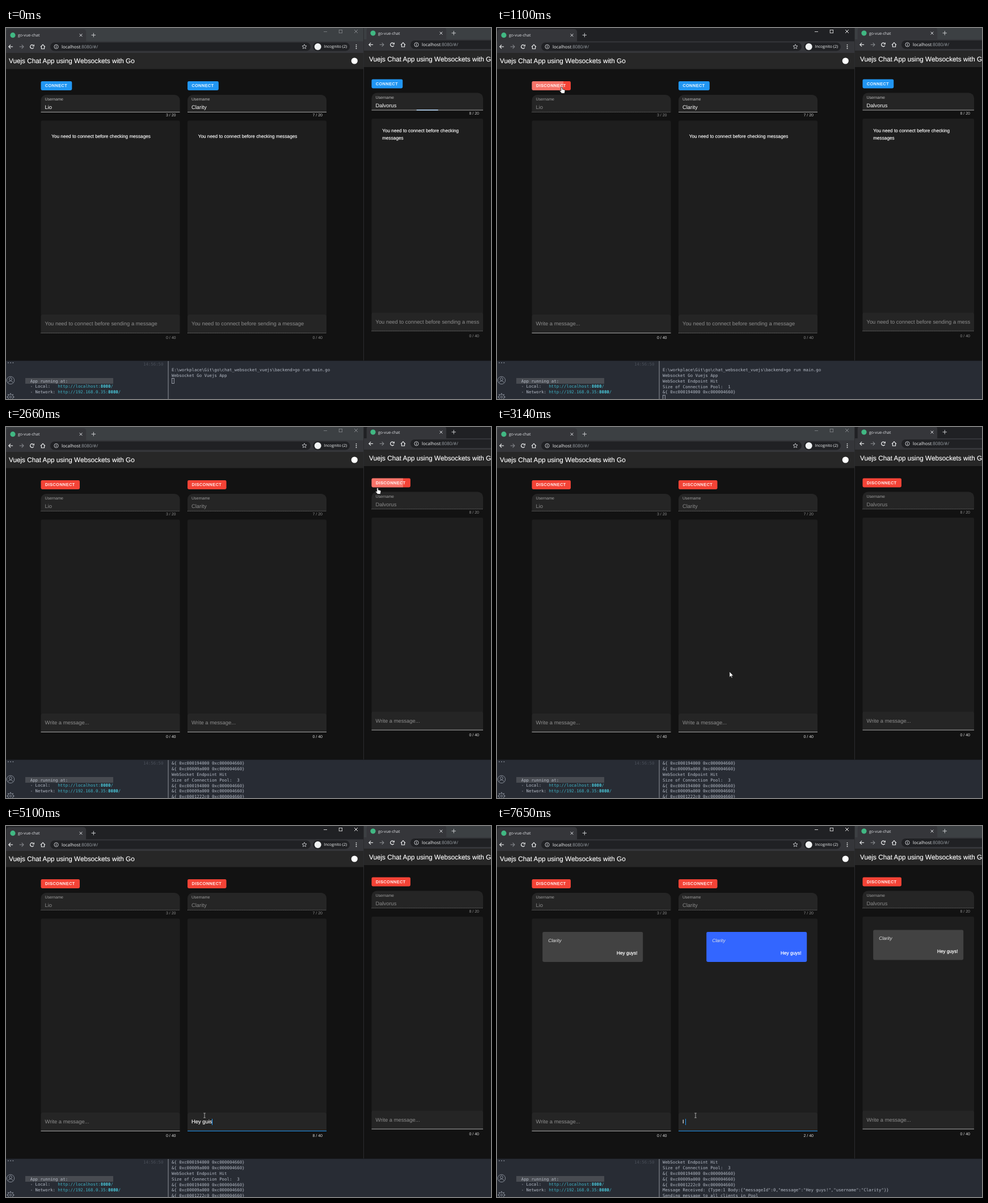
Animation, 855 px wide and 655 px high, one loop 8 s. Source, as an HTML page with a canvas:

```html
<!DOCTYPE html>
<html lang="en">
<head>
<meta charset="utf-8">
<title>Chat demo</title>
<style>
html, body { margin: 0; width: 855px; height: 655px; overflow: hidden; background: #121212; }
canvas { display: block; }
</style>
</head>
<body>
<canvas id="stage" width="855" height="655"></canvas>
<script>
const ctx = document.getElementById('stage').getContext('2d');
const LOOP = 8000;
const SANS = '"Liberation Sans", Arial, sans-serif';
const UI = '"Open Sans", "Noto Sans", sans-serif';
const MONO = '"DejaVu Sans Mono", monospace';
const BODY = 9.39, MEDIUM = 8.22, SMALL = 7.04;
const CLICK_DELAY = 75;
const FIELD_FOCUS = 3380, SENT = 7030;
const MESSAGE = 'Hey guys!', SENDER = 'Clarity';

const columns = [
  { x: 61.5, w: 245, dy: 0, name: 'Lio', press: 1020 },
  { x: 320, w: 245, dy: 0, name: SENDER, press: 1800 },
  { x: 644.5, w: 196.5, dy: -3.6, name: 'Dalvorus', press: 2580 }
];

// [time, text] of the message being typed
const typing = [
  [3320, ''], [4240, 'H'], [4400, 'He'], [4480, 'Hey'], [4630, 'Hey '],
  [4790, 'Hey g'], [4940, 'Hey gui'], [5100, 'Hey guis'], [5410, 'Hey gui'],
  [5560, 'Hey gu'], [5640, 'Hey g'], [6180, 'Hey gu'], [6330, 'Hey guy'],
  [6410, 'Hey guys'], [6720, MESSAGE], [SENT, ''], [7500, 'I'], [7650, 'I ']
];

// [time, x, y] of the pointer tip
const pointerPath = [
  [70, 470, 600], [780, 114, 104], [1170, 114, 104], [1650, 350, 104],
  [1960, 350, 104], [2350, 655, 107], [2740, 655, 107], [3300, 350, 511]
];

const client = id => `&{ 0xc000${id} 0xc000004660}`;
const joined = (size, ...ids) =>
  ['WebSocket Endpoint Hit', `Size of Connection Pool:  ${size}`, ...ids.map(client)];
const log = [
  [0, ['E:\\workplace\\Git\\go\\chat_websocket_vuejs\\backend>go run main.go', 'Websocket Go Vuejs App']],
  [columns[0].press + CLICK_DELAY, joined(1, '194000')],
  [columns[1].press + CLICK_DELAY, joined(2, '194000', '09a000')],
  [columns[2].press + CLICK_DELAY, joined(3, '194000', '09a000', '1222c0')],
  [SENT, [
    `Message Received: {Type:1 Body:{"messageId":0,"message":"${MESSAGE}","username":"${SENDER}"}}`,
    'Sending message to all clients in Pool'
  ]]
];

const clamp = v => Math.max(0, Math.min(1, v));
const ease = v => v * v * (3 - 2 * v);
const white = a => `rgba(255,255,255,${a})`;

function rect(x, y, w, h, color, radius = 0) {
  ctx.fillStyle = color;
  ctx.beginPath();
  ctx.roundRect(x, y, w, h, radius);
  ctx.fill();
}

function circle(x, y, r, color, filled = true) {
  ctx.beginPath();
  ctx.arc(x, y, r, 0, Math.PI * 2);
  ctx.fillStyle = ctx.strokeStyle = color;
  filled ? ctx.fill() : ctx.stroke();
}

function line(color, width, ...points) {
  ctx.strokeStyle = color;
  ctx.lineWidth = width;
  ctx.beginPath();
  points.forEach(([x, y]) => ctx.lineTo(x, y));
  ctx.stroke();
}

// y is the middle of the capital letters
function text(s, x, y, size, color, { font = SANS, style = '', align = 'left', heavy = 0, spacing = 0 } = {}) {
  ctx.font = `${style} ${size}px ${font}`;
  ctx.letterSpacing = `${spacing}px`;
  ctx.textAlign = align;
  ctx.fillStyle = color;
  ctx.fillText(s, x, y + size * 0.355);
  if (heavy) {
    ctx.strokeStyle = color;
    ctx.lineWidth = heavy;
    ctx.strokeText(s, x, y + size * 0.355);
  }
  const width = ctx.measureText(s).width;
  ctx.letterSpacing = '0px';
  return width;
}

function cross(x, y, r, color) {
  line(color, 1, [x - r, y - r], [x + r, y + r]);
  line(color, 1, [x + r, y - r], [x - r, y + r]);
}

function plus(x, y, r, color) {
  line(color, 1, [x - r, y], [x + r, y]);
  line(color, 1, [x, y - r], [x, y + r]);
}

function arrow(x, y, dir, color) {
  line(color, 1.1, [x - 3.6 * dir, y], [x + 3.6 * dir, y]);
  line(color, 1.1, [x + 0.4 * dir, y - 3.3], [x + 3.7 * dir, y], [x + 0.4 * dir, y + 3.3]);
}

function star(x, y) {
  const points = Array.from({ length: 11 }, (_, i) => {
    const a = -Math.PI / 2 + i * Math.PI / 5, r = i % 2 ? 1.9 : 4.2;
    return [x + r * Math.cos(a), y + r * Math.sin(a)];
  });
  line('#dadce0', 0.8, ...points);
}

function browser(left, width, dx, dy, focused) {
  ctx.save();
  ctx.beginPath();
  ctx.rect(left, 0, width, 587);
  ctx.clip();
  rect(left, 0, width, 587, '#121212');
  ctx.translate(dx, dy);
  rect(-5, 0, 640, 24, focused ? '#202124' : '#3c4043');
  rect(-5, -dy - 4, 640, 4, focused ? '#202124' : '#3c4043');
  rect(0.7, 2, 140.5, 24, '#35363a', [5, 5, 0, 0]);
  rect(-5, 23.5, 640, 20.5, '#35363a');

  circle(12, 12.7, 4.6, '#41b883');
  text('go-vue-chat', 21, 12.7, SMALL, '#dfe1e5', { font: UI });
  cross(132, 12.7, 2.4, '#dfe1e5');
  plus(154.3, 12.5, 3.7, '#c8cacd');

  arrow(8.5, 33, -1, '#f1f3f4');
  arrow(27.3, 33, 1, '#85888c');
  ctx.lineWidth = 1.2;
  ctx.strokeStyle = '#f1f3f4';
  ctx.beginPath();
  ctx.arc(46, 33, 3.2, 0.5, 5.4);
  ctx.stroke();
  line('#f1f3f4', 1.2, [49.3, 29.3], [49.3, 32], [46.6, 32]);
  line('#f1f3f4', 1.1, [61, 33.4], [65, 29.4], [69, 33.4]);
  line('#f1f3f4', 1.1, [62.4, 32.6], [62.4, 36.8], [67.6, 36.8], [67.6, 32.6]);

  rect(78, 25.5, 459, 15, '#202124', 7.5);
  ctx.lineWidth = 0.9;
  circle(88.5, 33, 3.6, '#dadce0', false);
  rect(88, 32.4, 1, 2.6, '#dadce0');
  rect(88, 30.8, 1, 1, '#dadce0');
  const host = text('localhost', 98, 33, 7.9, '#f1f3f4', { font: UI });
  text(':8080/#/', 98 + host, 33, 7.9, '#9aa0a6', { font: UI });
  star(526, 33);
  rect(541, 25.5, 65, 15, '#202124', 7.5);
  circle(549.7, 33, 6, '#f1f3f4');
  text('Incognito (2)', 560.5, 33, SMALL, '#f1f3f4', { font: UI });
  for (let i = -1; i < 2; i++) circle(617.5, 33 + i * 3.2, 0.9, '#f1f3f4');

  const control = focused ? '#f4f4f4' : '#85888c';
  line(control, 0.8, [560, 6.5], [566, 6.5]);
  ctx.lineWidth = 0.8;
  ctx.strokeRect(587.2, 3.4, 5.4, 5.4);
  cross(617, 6, 2.9, control);

  rect(-5, 44, 640, 28.5, '#272727');
  text('Vuejs Chat App using Websockets with Go', 5, 58.3, 11.74, '#fff', { heavy: 0.15 });
  circle(614.3, 58, 5.6, '#fff');
  ctx.restore();
}

function underline(col, y, enabled) {
  if (enabled) return rect(col.x, y, col.w, 1, white(0.6));
  ctx.setLineDash([1.2, 1.2]);
  line(white(0.42), 1, [col.x, y + 0.5], [col.x + col.w, y + 0.5]);
  ctx.setLineDash([]);
}

function button(col, t, online, hovered) {
  const width = online ? 68.5 : 54.8;
  rect(col.x, 94, width, 16, online ? '#f44336' : '#2196f3', 2.4);
  const age = t - col.press;
  if (age >= 0 && age < 480) {
    const alpha = 0.26 * clamp((age + 20) / 80) * (1 - clamp((age - 180) / 300));
    rect(col.x, 94, 55.5, 16, white(alpha), [2.4, 0, 0, 2.4]);
  } else if (hovered) {
    rect(col.x, 94, width, 16, white(0.08), 2.4);
  }
  text(online ? 'DISCONNECT' : 'CONNECT', col.x + 7.5, 102, SMALL, '#fff',
    { heavy: 0.25, spacing: SMALL * 0.0893 });
}

function chatCard(col, own) {
  const w = Math.min(177, col.w - 37.5);
  const x = own ? col.x + col.w - 18.8 - w : col.x + 18.7;
  rect(x, 187, w, 53, own ? '#3366ff' : '#424242', 2.4);
  text(SENDER, x + 10, 202, MEDIUM, '#e6e6e6', { style: 'italic' });
  text(MESSAGE, x + w - 9.6, 224.3, MEDIUM, '#fff', { align: 'right', heavy: 0.25 });
}

function messageField(col, t, online) {
  const typed = col.name === SENDER && t >= FIELD_FOCUS;
  const [since, draft] = typed ? typing.findLast(([time]) => time <= t) : [0, ''];
  const x = col.x + 7, right = col.x + col.w - 7;
  rect(col.x, 506, col.w, 33, '#252525', [2.4, 2.4, 0, 0]);
  underline(col, 538, online);

  ctx.save();
  ctx.beginPath();
  ctx.rect(x - 1, 508, right - x + 1, 28);
  ctx.clip();
  let width = 0;
  if (draft) {
    width = text(draft, x, 522, BODY, '#fff', { heavy: 0.15 });
  } else {
    text(online ? 'Write a message...' : 'You need to connect before sending a message',
      x, 522, BODY, '#8e8e8e');
  }
  ctx.restore();

  if (typed) {
    const grow = ease(clamp((t - FIELD_FOCUS + 40) / 280));
    rect(col.x + col.w * (1 - grow) / 2, 538, col.w * grow, 1, '#2196f3');
    if ((t - since) % 1060 < 530) rect(Math.round(x + width), 517, 1, 11, '#2196f3');
  }
  text(`${draft.length} / 40`, right, 547, SMALL, online ? '#dcdcdc' : '#8c8c8c', { align: 'right' });
}

function chat(col, t, pointer) {
  const online = t >= col.press + CLICK_DELAY;
  const mid = col.x + col.w / 2;
  ctx.save();
  ctx.translate(0, col.dy);
  button(col, t, online, pointer && pointer.button === col);

  rect(col.x, 118, col.w, 30.5, '#252525', [9.4, 9.4, 0, 0]);
  text('Username', col.x + 7, 126, SMALL, online ? '#a0a0a0' : '#bdbdbd');
  text(col.name, col.x + 7, 140, BODY, online ? '#8a8a8a' : '#fff');
  underline(col, 148, !online);
  if (col === columns[2] && t < 70) rect(mid - 19, 147.6, 38, 1.4, '#b5d7fa');
  text(`${col.name.length} / 20`, col.x + col.w - 7, 154, SMALL, online ? '#8c8c8c' : '#c4c4c4', { align: 'right' });

  rect(col.x, 163.5, col.w, 343, '#1e1e1e', [2.4, 2.4, 0, 0]);
  if (!online) {
    const notice = 'You need to connect before checking';
    const lines = col.w > 215 ? [notice + ' messages'] : [notice, 'messages'];
    const top = lines.length > 1 ? 184.7 : 190.6;
    lines.forEach((s, i) => text(s, col.x + 18.7, top + i * 12.9, MEDIUM, '#fff', { heavy: 0.15 }));
  } else if (t >= SENT) {
    chatCard(col, col.name === SENDER);
  }
  messageField(col, t, online);
  ctx.restore();
}

function terminal(t) {
  const size = 7.36, advance = 4.43, pitch = 9.93, gray = '#b4bac5';
  const mono = (s, x, y, color, style = '') => text(s, x, y, size, color, { font: MONO, style });
  rect(0, 587, 855, 68, '#282c34');
  rect(0, 587, 855, 1, '#1b1d22');
  rect(285.5, 588, 1, 67, '#90949b');

  for (let i = 0; i < 3; i++) circle(4 + i * 4.2, 591, 0.9, '#858b96');
  ctx.lineWidth = 1;
  circle(8, 622, 6.7, '#858b96', false);
  circle(8, 620, 2.4, '#858b96', false);
  ctx.beginPath();
  ctx.arc(8, 627.5, 4.4, Math.PI * 1.1, Math.PI * 1.9);
  ctx.stroke();
  circle(8, 651.5, 4.7, '#858b96', false);
  circle(8, 651.5, 1.7, '#858b96', false);
  for (let i = 0; i < 8; i++) {
    const c = Math.cos(i * Math.PI / 4), s = Math.sin(i * Math.PI / 4);
    line('#858b96', 1.6, [8 + 4.7 * c, 651.5 + 4.7 * s], [8 + 6.7 * c, 651.5 + 6.7 * s]);
  }

  mono('14:56:50', 242, 593, '#4a4f59');
  rect(34, 618, 155, 10, '#484b51');
  mono('App running at:', 42.7, 623, gray);
  [['- Local:', 'http://localhost:'], ['- Network:', 'http://192.168.0.35:']].forEach(([label, url], i) => {
    const y = 632.7 + i * pitch, x = 42.7 + 11 * advance, port = x + url.length * advance;
    mono(label, 42.7, y, gray);
    mono(url, x, y, '#3fb5c8');
    mono('8080', port, y, '#4cd1e4', 'bold');
    mono('/', port + 4 * advance, y, '#3fb5c8');
  });

  const lines = log.filter(([time]) => time <= t).flatMap(([, rows]) => rows);
  const top = Math.max(-1, lines.length - 7);
  const rowY = i => 593.2 + (i - top) * pitch;
  lines.forEach((s, i) => { if (i >= top) mono(s, 292, rowY(i), gray); });
  ctx.strokeStyle = gray;
  ctx.lineWidth = 0.8;
  ctx.strokeRect(292.5, rowY(lines.length) - 4.6, 3.8, 9.2);
}

function pointerAt(t) {
  if (t < pointerPath[0][0]) return null;
  const i = pointerPath.findLastIndex(([time]) => time <= t);
  const [t0, x0, y0] = pointerPath[i];
  const [t1, x1, y1] = pointerPath[i + 1] || [t0 + 1, x0, y0];
  const k = ease(clamp((t - t0) / (t1 - t0)));
  const x = x0 + (x1 - x0) * k, y = y0 + (y1 - y0) * k;
  const inside = (c, top, bottom, w) =>
    x >= c.x && x <= c.x + w && y >= top + c.dy && y <= bottom + c.dy;
  return {
    x, y,
    button: columns.find(c => inside(c, 94, 111, t >= c.press + CLICK_DELAY ? 68.5 : 54.8)),
    field: columns.some(c => inside(c, 506, 539, c.w))
  };
}

const HAND = new Path2D('M-1.2 1Q0-.8 1.2 1V4L5 5Q6.2 5.4 6 7L5 11.5H0L-3.4 7.4Q-3.2 5.6-1.2 7Z');
const ARROW = new Path2D('M0 0V10L2.3 8L3.9 11.5L5.4 10.8L3.9 7.4H7Z');

function drawPointer({ x, y, button, field }) {
  ctx.save();
  ctx.translate(x, y);
  if (field) {
    line('#c4c4c4', 0.8, [0, -4], [0, 4]);
    for (const end of [-4, 4]) line('#c4c4c4', 0.8, [-1.8, end], [1.8, end]);
  } else {
    const shape = button ? HAND : ARROW;
    ctx.fillStyle = '#fff';
    ctx.strokeStyle = '#111';
    ctx.lineWidth = 0.8;
    ctx.fill(shape);
    ctx.stroke(shape);
  }
  ctx.restore();
}

function draw(now) {
  const t = now % LOOP;
  const secondFocused = t >= columns[2].press && t < FIELD_FOCUS;
  const firstFocused = t >= columns[0].press && !secondFocused;
  const pointer = pointerAt(t);
  ctx.textRendering = 'geometricPrecision';
  terminal(t);
  browser(0, 631, 0, 0, firstFocused);
  browser(631, 224, 635, -3.6, secondFocused);
  rect(630, 0, 1, 587, '#2b2c2f');
  columns.forEach(col => chat(col, t, pointer));
  if (pointer) drawPointer(pointer);
  requestAnimationFrame(draw);
}
requestAnimationFrame(draw);
</script>
</body>
</html>
```
